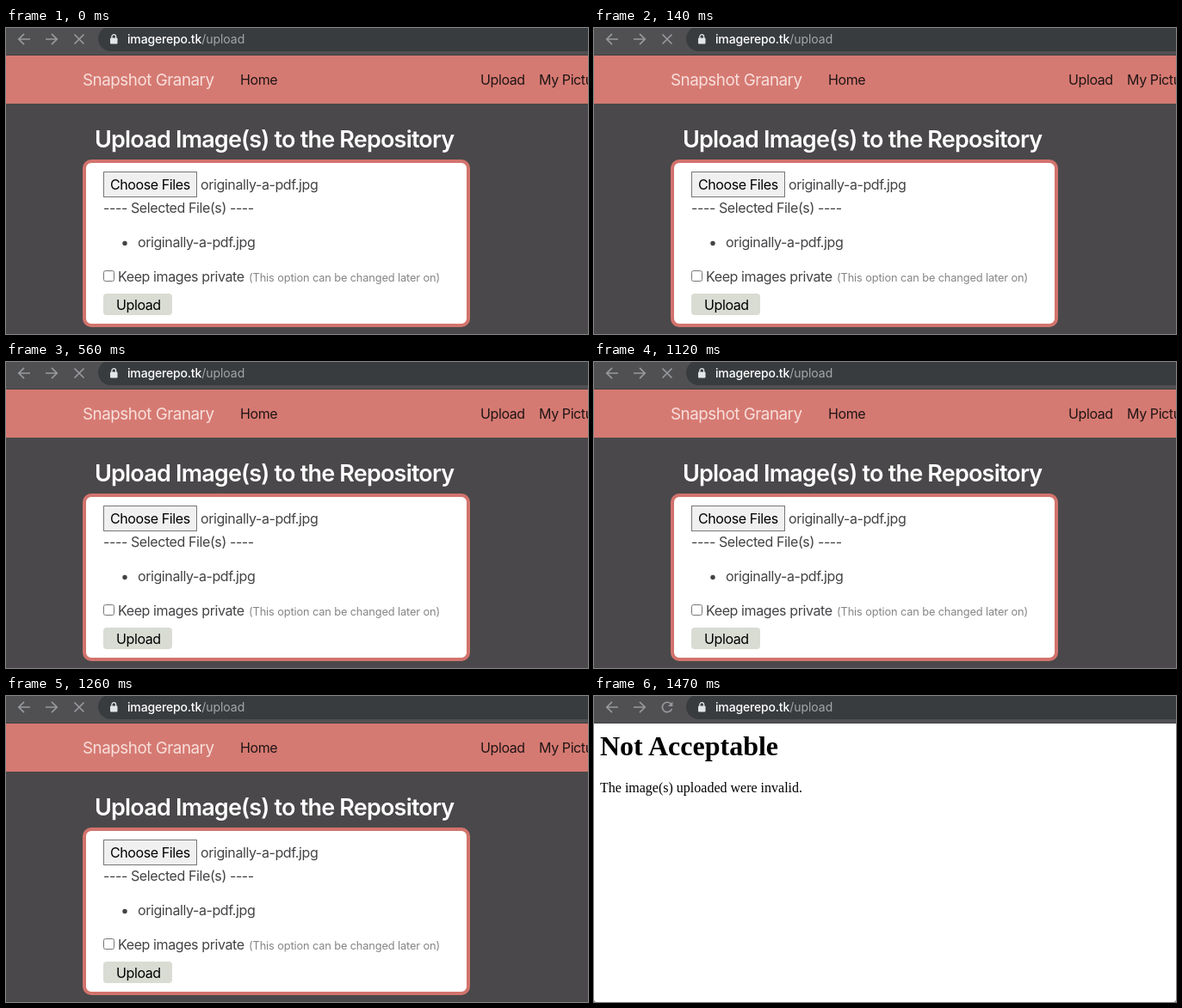
Recreate the animation shown at these times as an HTML page. Size 676x356 px, loop 1960 ms.

```html
<!DOCTYPE html>
<html lang="en">
<head>
<meta charset="utf-8">
<title>Upload</title>
<style>
  html, body { margin: 0; width: 100%; height: 100%; overflow: hidden; background: #4a484a; }
  svg { display: block; width: 676px; height: 356px; }
  text {
    font: 16px Inter, sans-serif;
    font-optical-sizing: none;
    letter-spacing: -.025em;
    white-space: pre;
  }
  .icon { fill: none; stroke: #97999c; stroke-width: 1.7; }
  .url { font-size: 14px; letter-spacing: -.002em; fill: #a4a7aa; }
  .host { font-weight: 500; letter-spacing: -.012em; fill: #fff; }
  .brand { font-size: 18.8px; fill: #f8dfdc; }
  .title { font-size: 27px; font-weight: 600; letter-spacing: -.03em; fill: #fff; }
  .body { fill: #434245; }
  .note { font-size: 12.8px; letter-spacing: -.01em; fill: #858585; }
  .plain { font-family: "Liberation Serif", serif; letter-spacing: 0; }
  .error { font-size: 32px; font-weight: bold; }
</style>
</head>
<body>
<svg viewBox="0 0 676 356">
  <g id="form">
    <rect width="676" height="356" fill="#4a484a"/>
    <rect y="32" width="676" height="56" fill="#d57a72"/>
    <text class="brand" x="89" y="67">Snapshot Granary</text>
    <text x="272" y="66" fill="#211516">Home</text>
    <text x="551" y="66" fill="#211516">Upload</text>
    <text x="619" y="66" fill="#211516">My Pictures</text>

    <text class="title" x="103" y="139">Upload Image(s) to the Repository</text>
    <rect x="91" y="155" width="446" height="191" rx="8" fill="#fff" stroke="#d2736d" stroke-width="4"/>

    <rect x="113.5" y="167.5" width="108" height="29" fill="#f0f0f0" stroke="#777"/>
    <text x="121" y="188">Choose Files</text>
    <text class="body" x="226" y="188">originally-a-pdf.jpg</text>
    <text class="body" x="113" y="215">---- Selected File(s) ----</text>
    <circle class="body" cx="138" cy="250.5" r="2.7"/>
    <text class="body" x="153" y="255">originally-a-pdf.jpg</text>

    <rect x="113.5" y="282.5" width="12" height="12" rx="2" fill="#fff" stroke="#777"/>
    <text class="body" x="130" y="295">Keep images private</text>
    <text class="note" x="282" y="295">(This option can be changed later on)</text>

    <rect x="113" y="309" width="80" height="25" rx="4" fill="#d9dcd3"/>
    <text x="128" y="328">Upload</text>
  </g>

  <g id="error">
    <rect width="676" height="356" fill="#fff"/>
    <text class="plain error" x="7" y="69">Not Acceptable</text>
    <text class="plain" x="7" y="112">The image(s) uploaded were invalid.</text>
    <path d="M0 354v2h2zM676 354v2h-2z" fill="#888"/>
  </g>

  <g id="toolbar">
    <rect width="676" height="32" fill="#505053"/>
    <rect y="31" width="676" height="1" fill="#3f3e41"/>
    <rect x="107" y="-2" width="620" height="29" rx="14.5" fill="#393c3f"/>
    <path class="icon" d="M28 13H15M21 6.8L14.8 13L21 19.2"/>
    <path class="icon" d="M46 13H59M53 6.8L59.2 13L53 19.2"/>
    <path class="icon" id="stop" d="M79.5 7.5l11 11M90.5 7.5l-11 11"/>
    <g id="reload">
      <path class="icon" d="M89.2 9A5.7 5.7 0 1 0 90.4 15"/>
      <path d="M91.3 6.6V12H85.9z" fill="#97999c"/>
    </g>
    <rect x="121" y="11.5" width="8.5" height="7" rx="1" fill="#e4e5e7"/>
    <path d="M122.9 12V10a2.35 2.35 0 0 1 4.7 0V12" fill="none" stroke="#e4e5e7" stroke-width="1.3"/>
    <text class="url" x="141" y="18"><tspan class="host">imagerepo.tk</tspan>/upload</text>
  </g>
</svg>
<script>
  const LOOP = 1960, RESPONSE = 1470;
  const show = (id, visible) =>
    document.getElementById(id).setAttribute('display', visible ? 'inline' : 'none');

  function draw(now) {
    const loading = now % LOOP < RESPONSE;
    for (const id of ['form', 'stop']) show(id, loading);
    for (const id of ['error', 'reload']) show(id, !loading);
  }

  const start = performance.now();
  function tick() {
    draw(performance.now() - start);
    requestAnimationFrame(tick);
  }
  tick();
</script>
</body>
</html>
```
